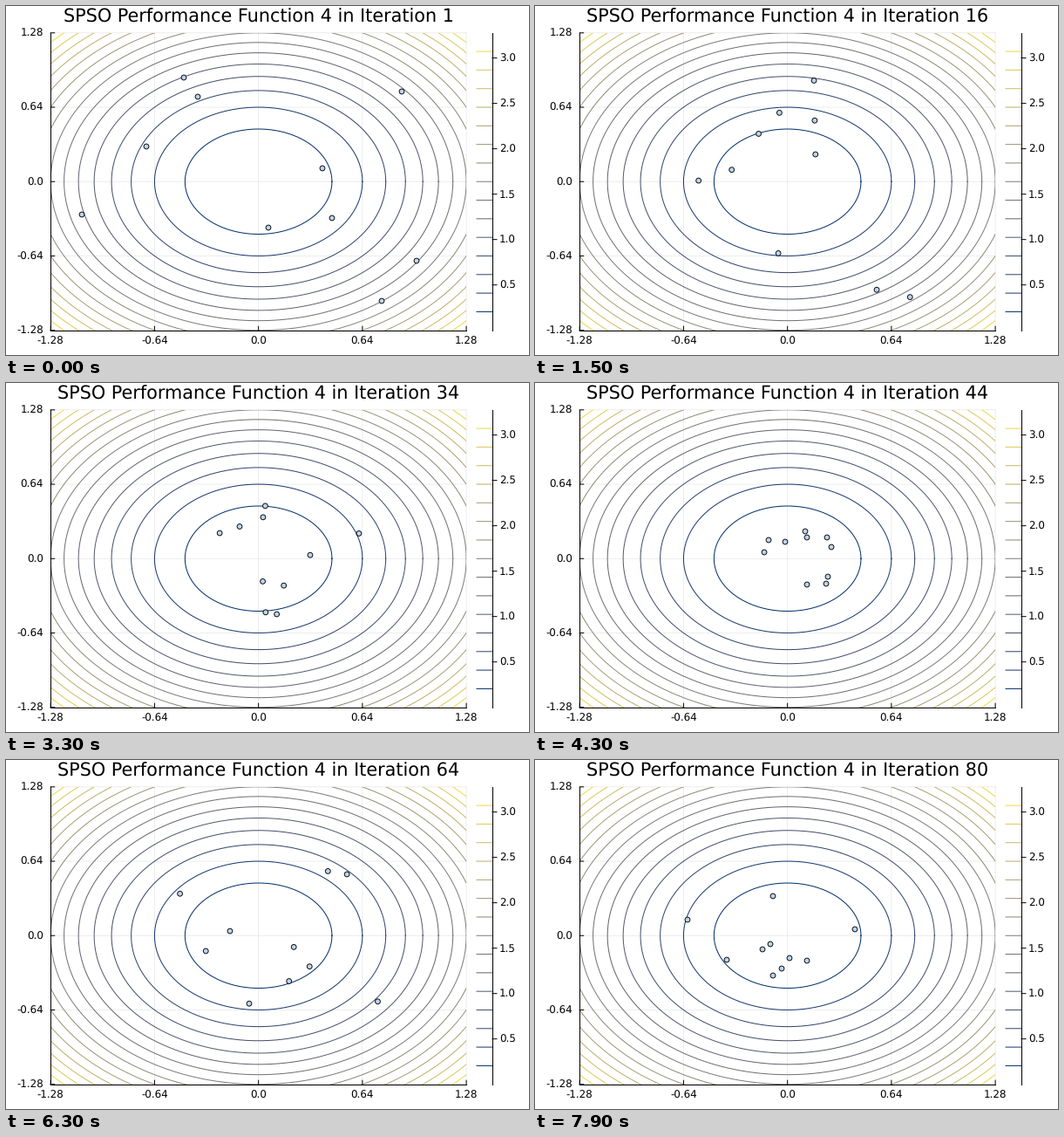
A matplotlib script for the animation above (8 s loop, 600x400 px).

```python
import numpy as np
import matplotlib.pyplot as plt
from matplotlib.animation import FuncAnimation
from matplotlib.patches import Circle, Rectangle

W, H, DPI = 600, 400, 100
PX = 72 / DPI  # one pixel in points
FRAMES, INTERVAL = 80, 100

LEFT, RIGHT, TOP, BOTTOM = 51.2, 528.1, 30.8, 371.7
LIM = 1.28
CX, CY = (LEFT + RIGHT) / 2, (TOP + BOTTOM) / 2
SX, SY = (RIGHT - LEFT) / (2 * LIM), (BOTTOM - TOP) / (2 * LIM)
ZMAX = 2 * LIM ** 2
BAR_X0, BAR_X1 = 540, 558

plt.rcParams.update({"font.family": "DejaVu Sans", "text.hinting": "none"})
fig = plt.figure(figsize=(W / DPI, H / DPI), dpi=DPI, facecolor="white")
ax = fig.add_axes([0, 0, 1, 1])
ax.set_xlim(0, W)
ax.set_ylim(H, 0)
ax.axis("off")

# The swarm scattered, gathered and loose again, in pixels
SCATTERED = [(204, 82), (220, 104), (161, 161), (87, 239), (301, 254),
             (363, 186), (374, 243), (454, 98), (471, 292), (431, 338)]
GATHERED = [(263, 194), (287, 182), (312, 177), (312, 231), (334, 230),
            (310, 170), (335, 177), (340, 188), (336, 222), (268, 180)]
LOOSE = [(220, 229), (175, 183), (270, 211), (273, 247), (283, 239),
         (261, 217), (273, 156), (367, 194), (312, 230), (292, 227)]
GATHER_AT = 44

scattered, gathered, loose = map(np.array, (SCATTERED, GATHERED, LOOSE))
rng = np.random.default_rng(4)
phase = rng.uniform(0, 2 * np.pi, gathered.shape)
speed = rng.uniform(0.6, 1.0, gathered.shape)
reach = np.geomspace(0.5, 2.5, len(gathered))[:, None] * (45, 50)


def positions(n):
    """Drift between poses while each particle swings about its path."""
    if n <= GATHER_AT:
        t = (n - 1) / (GATHER_AT - 1)
        a, b, u = scattered, gathered, 1 - (1 - t) ** 2
    else:
        t = (n - GATHER_AT) / (FRAMES - GATHER_AT)
        a, b, u = gathered, loose, t
    swing = np.sin(np.pi * t) * reach * np.sin(speed * n + phase)
    return np.clip(a + (b - a) * u + swing, (LEFT, TOP), (RIGHT, BOTTOM))


def line(x, y, color="black", width=1.0, snap=False, **kw):
    return ax.plot(x, y, color=color, lw=width * PX, snap=snap, **kw)[0]


def label(x, y, text, size=11.9, **kw):
    return ax.text(x, y, text, fontsize=size * PX, color="black",
                   va="baseline", **kw)


def bar_y(z):
    return BOTTOM - z / ZMAX * (BOTTOM - TOP)


clip = Rectangle((LEFT, TOP), RIGHT - LEFT, BOTTOM - TOP, transform=ax.transData)

for v in np.linspace(-LIM, LIM, 5):
    x, y = CX + v * SX, CY - v * SY
    line([x, x], [TOP, BOTTOM], alpha=0.1, width=0.7, zorder=1)
    line([LEFT, RIGHT], [y, y], alpha=0.1, width=0.7, zorder=1)
    line([x, x], [BOTTOM, BOTTOM - 4.5], zorder=4)
    line([LEFT, LEFT + 4.5], [y, y], zorder=4)
    name = f"{v:.2f}" if v else "0.0"
    label(x, 388, name, ha="center")
    label(43, y + 4.3, name, ha="right")
line([LEFT, LEFT], [TOP, BOTTOM], snap=True, zorder=4)
line([LEFT, RIGHT], [BOTTOM, BOTTOM], snap=True, zorder=4)

theta = np.linspace(0, 2 * np.pi, 361)
for z in ZMAX * np.arange(1, 16) / 16:
    color = plt.cm.cividis(z / ZMAX)
    r = np.sqrt(z)
    ring = line(CX + r * SX * np.cos(theta), CY + r * SY * np.sin(theta),
                color, zorder=2)
    ring.set_clip_path(clip)
    line([BAR_X0, BAR_X1], [bar_y(z)] * 2, color, zorder=2)

line([BAR_X1, BAR_X1], [TOP, BOTTOM], snap=True, zorder=4)
for z in np.arange(0.5, 3.1, 0.5):
    line([BAR_X1, BAR_X1 + 5], [bar_y(z)] * 2, zorder=4)
    label(566, bar_y(z) + 4.3, f"{z:.1f}", ha="left")

title = label(CX, 18.3, "", size=20.8, ha="center")
dots = [Circle((0, 0), 2.9, fc="#bcd4ee", ec="black", lw=0.9 * PX, zorder=5)
        for _ in gathered]
for dot in dots:
    ax.add_patch(dot)
    dot.set_clip_path(clip)


def update(i):
    n = i + 1
    for dot, pos in zip(dots, positions(n)):
        dot.center = pos
    title.set_text(f"SPSO Performance Function 4 in Iteration {n}")
    return [*dots, title]


anim = FuncAnimation(fig, update, frames=FRAMES, interval=INTERVAL,
                     repeat=True, repeat_delay=0, blit=False)
plt.show()
```
